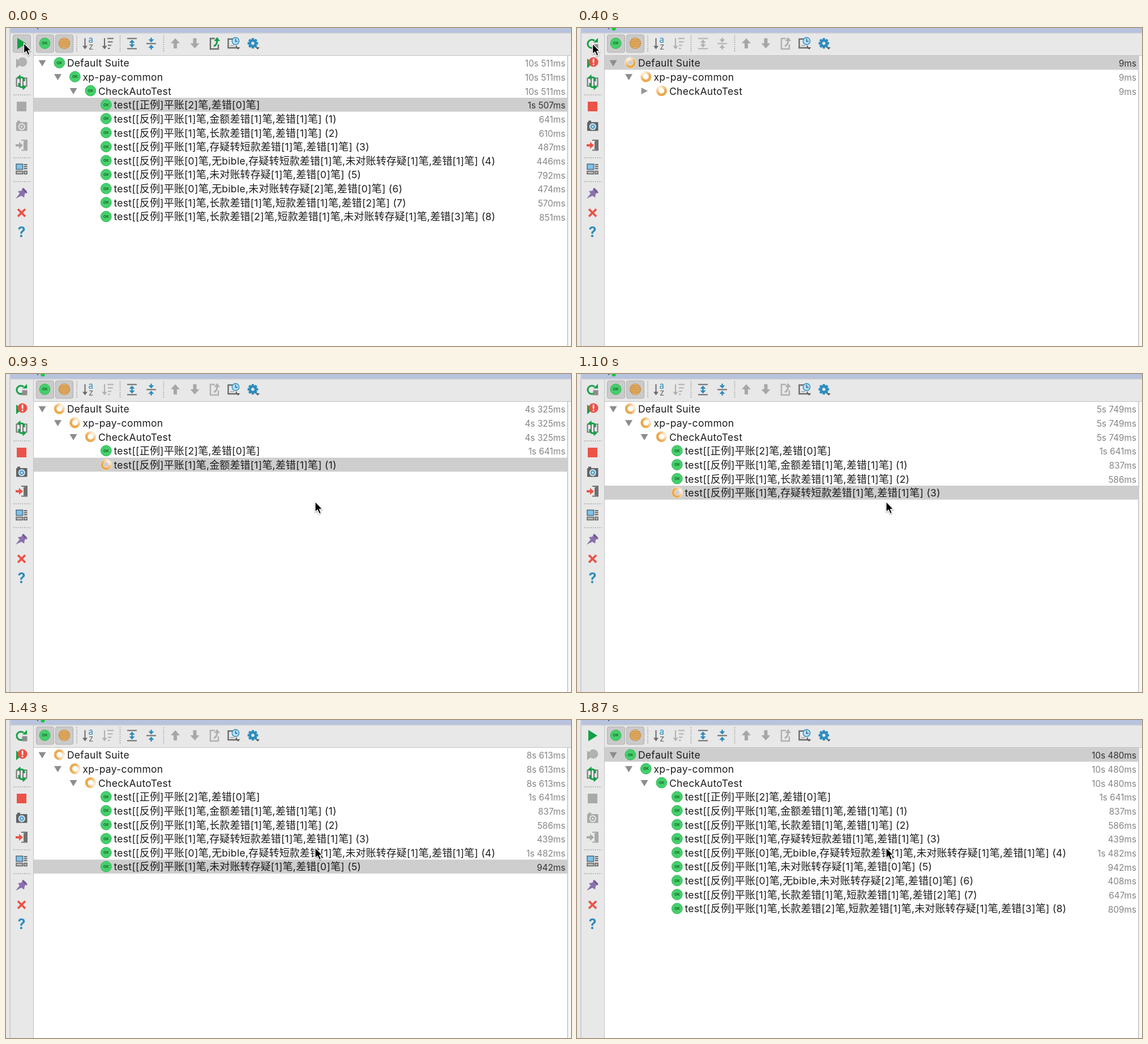
An HTML page for the animation above (1900 ms loop, 998 px wide and 561 px high).

```html
<!DOCTYPE html>
<html lang="zh-CN">
<head>
<meta charset="utf-8">
<title>Test runner</title>
<style>
html, body { margin: 0; width: 100%; height: 100%; overflow: hidden; background: #fff; }
svg { display: block; width: 998px; height: 561px; }
text { font-family: Inter, "Noto Sans CJK SC", "Noto Sans CJK", sans-serif; }
.name { font-size: 17.5px; letter-spacing: .32px; fill: #1c1c1c; }
.name tspan { font-family: "Noto Sans CJK SC", "Noto Sans CJK", sans-serif; font-size: 18.1px; letter-spacing: 0; }
.time { font-size: 15.3px; fill: #858585; text-anchor: end; }
.time.sel { fill: #333; }
.ok { font-size: 6.6px; font-weight: 700; fill: #17662f; text-anchor: middle; }
.dots { stroke: #9b9b9b; stroke-width: 1.6; stroke-dasharray: 1.6 2.2; }
</style>
</head>
<body>
<svg viewBox="0 0 998 561">
  <defs>
    <g id="ok">
      <circle r="9.4" fill="#45cf6b" stroke="#35b65a" stroke-width="1"/>
      <text class="ok" y="2.3">OK</text>
    </g>
    <g id="spinner"></g>
  </defs>
  <g id="chrome"></g>
  <g id="tree"></g>
  <g id="tools"></g>
  <path id="cursor" d="M0 0V18.6L4.3 14.7L7.3 21.6L10.500 20.200L7.600 13.500H13.2Z" fill="#000" stroke="#fff" stroke-width="1.3" stroke-linejoin="round" style="filter:drop-shadow(0 1px 1px #0006)"/>
</svg>
<script>
const LOOP = 1900, RESTART = 270, FIRST_TEST = 640, FINISHED = 1700;
const ROW = 24.66, INDENT = 27.5;
const GREY = '#a9a9a9', DARK = '#6b6b6b', GREEN = '#12a045', RED = '#ec5247', BLUE = '#2b8cbe';

const suites = ['Default Suite', 'xp-pay-common', 'CheckAutoTest'];
const tests = [
  '[正例]平账[2]笔,差错[0]笔]',
  '[反例]平账[1]笔,金额差错[1]笔,差错[1]笔] (1)',
  '[反例]平账[1]笔,长款差错[1]笔,差错[1]笔] (2)',
  '[反例]平账[1]笔,存疑转短款差错[1]笔,差错[1]笔] (3)',
  '[反例]平账[0]笔,无bible,存疑转短款差错[1]笔,未对账转存疑[1]笔,差错[1]笔] (4)',
  '[反例]平账[1]笔,未对账转存疑[1]笔,差错[0]笔] (5)',
  '[反例]平账[0]笔,无bible,未对账转存疑[2]笔,差错[0]笔] (6)',
  '[反例]平账[1]笔,长款差错[1]笔,短款差错[1]笔,差错[2]笔] (7)',
  '[反例]平账[1]笔,长款差错[2]笔,短款差错[1]笔,未对账转存疑[1]笔,差错[3]笔] (8)'
].map(s => 'test[' + s);
const oldTimes = [1507, 641, 610, 487, 446, 792, 474, 570, 851];
const newTimes = [1641, 837, 586, 439, 1482, 942, 408, 647, 809];
const totals = [4325, 5162, 5749, 6189, 7671, 8613, 9022, 9670, 10480];
const doneAt = totals.map(ms => 860 + 0.131 * (ms - totals[0]));

const $ = id => document.getElementById(id);
const path = (d, fill) => `<path d="${d}" fill="${fill}"/>`;
const line = (d, color, width = 2) => `<path d="${d}" fill="none" stroke="${color}" stroke-width="${width}"/>`;
const rect = (x, y, w, h, fill, extra = '') => `<rect x="${x}" y="${y}" width="${w}" height="${h}" fill="${fill}" ${extra}/>`;
const circle = (x, y, r, fill, extra = '') => `<circle cx="${x}" cy="${y}" r="${r}" fill="${fill}" ${extra}/>`;
const button = x => rect(x, 12, 31, 31, '#cacaca', 'rx="3" stroke="#b0b0b0"');
const duration = ms => (ms >= 1000 ? Math.floor(ms / 1000) + 's ' : '') + ms % 1000 + 'ms';
const mixScripts = s => s.replace(/[\u4e00-\u9fff]+/g, '<tspan>$&</tspan>');

function drawSpinner() {
  const count = 16, step = 2 * Math.PI / count, r = 7.2;
  const point = a => `${(r * Math.cos(a)).toFixed(2)} ${(r * Math.sin(a)).toFixed(2)}`;
  let out = circle(0, 0, r, 'none', 'stroke="#fdf3e4" stroke-width="5.6"');
  for (let i = 0; i < count; i++) {
    const a = i * step, light = 60 + 32 * Math.pow((1 + Math.cos(a + step / 2)) / 2, 2.2);
    out += line(`M${point(a)}A${r} ${r} 0 0 1 ${point(a + step + 0.04)}`, `hsl(35 80% ${light}%)`, 4.4);
  }
  $('spinner').innerHTML = out;
}

function drawChrome() {
  const stripes = [-6, -3, 0, 3, 6].map(y => {
    const half = Math.sqrt(90 - y * y);
    return line(`M${103 - half} ${27 + y}h${2 * half}`, '#b98645', 1.2);
  }).join('');
  const teeth = [0, 45, 90, 135].map(a =>
    `<rect x="-2.2" y="-9.3" width="4.4" height="18.6" rx="1" fill="${BLUE}" transform="translate(436 27) rotate(${a})"/>`).join('');
  const drop = x => path(`M${x - 3.5} 34h7l-3.5 4z`, '#555');

  $('chrome').innerHTML =
    rect(0, 0, 998, 561, '#e8e8e8') + rect(8, 0, 990, 8.5, '#b8c3dd') +
    line('M8 9H998', '#c4c4c8', 1) + line('M7 0V561', '#b4b4b4', 1) +
    rect(49, 49, 949, 512, '#fff') + line('M48.5 9V561', '#c3c3c3', 1) + line('M49 48.5H998', '#c3c3c3', 1) +
    rect(993, 49, 5, 512, '#f8f8f8') + line('M992 49V561', '#b0b0b0', 1.2) +
    [118, 229, 271].map(y => `<path class="dots" d="M13 ${y}H44"/>`).join('') +
    [125, 201.5, 278.5].map(x => `<path class="dots" d="M${x} 13V43"/>`).join('') +
    button(53.5) + button(87.5) + '<use href="#ok" x="68.5" y="27"/>' +
    circle(103, 27, 9.6, '#eeb665', 'stroke="#c08a44"') + stripes +
    // alphabetical sort
    line('M139.5 18V35', DARK) + path('M135 31.5h9l-4.5 6z', DARK) +
    `<text x="145.500" y="26" font-size="15" fill="${BLUE}">a</text><text x="146" y="38" font-size="15" fill="${DARK}">z</text>` +
    // previous, next
    path('M299 18l8 9h-5v9h-6v-9h-5z', '#a7a7a7') + path('M333.500 36l8-9h-5v-9h-6v9h-5z', '#a7a7a7') +
    // history, settings
    line('M402 19.5H392.500V35H407V31', DARK, 2.4) + line('M396 31h7', GREY, 1.6) +
    circle(405.5, 23, 6.2, '#b5def4', `stroke="${BLUE}" stroke-width="1.4"`) + line('M405.500 19V23.500H409', '#285f82', 1.4) + drop(410) +
    teeth + circle(436, 27, 7, BLUE) + circle(436, 27, 2.8, '#e8e8e8') + drop(444.5) +
    // toggle auto-test
    line('M25 88.500H18.500V102.500H25ZM30 88.500H36.500V102.500H30Z', '#777', 2) +
    line('M32 94V91Q32 86.500 24 87M23 97V100Q23 105 31 104.500', GREEN, 3) +
    path('M25.500 82v10l-6-5z', GREEN) + path('M29.500 99.500v10l6-5z', GREEN) +
    // layout
    rect(18, 240, 11.5, 9.5, '#7cc3ea', 'stroke="#4f6c80" stroke-width="1.5"') +
    [240, 243.5, 247].map(y => rect(31.5, y, 6, 2.2, '#6d6d6d')).join('') +
    rect(18, 252.5, 11.5, 5, '#b9b9b9', 'stroke="#626262" stroke-width="1.5"') +
    rect(32, 252.5, 5, 5, '#b9b9b9', 'stroke="#626262" stroke-width="1.5"') +
    // pin
    path('M17 301l7-9-3-4 6-1 4-5 6 6-4 5-1 6-5-3z', '#8b70ad') + line('M29 283L37 291', '#6f568f', 2.4) +
    // close, help
    line('M21 319.500L34 332.500M34 319.500L21 332.500', RED, 3.8) +
    `<text x="27.500" y="369" font-size="25" font-weight="700" fill="${BLUE}" text-anchor="middle">?</text>`;
}

function drawTools(s) {
  const faint = '#b0b0b0';
  const on = color => s.running ? color : GREY;
  const sort = s.before ? DARK : faint;
  const edge = s.starting ? faint : DARK, arrow = s.starting ? faint : BLUE;
  let out = rect(55, 0, 2, 2, '#566080');

  if (s.running) {
    out += circle(65, 1, 3.5, '#16c735');
    out += line('M31 33.500A7.300 7.300 0 1 1 31 22.500', GREEN, 3) + path('M29 25.500h8v-8z', GREEN) + rect(28.5, 28.5, 9, 9, '#8d8d8d');
    out += path('M18 54l10 8-10 9z', GREEN) + circle(29, 60, 8.6, RED) + rect(27.8, 54, 2.6, 7.4, '#fff') + rect(27.8, 63, 2.6, 2.6, '#fff');
  } else {
    if (s.before) out += button(12.5);
    out += path('M20 17.500L36 27.500L20 37.500Z', GREEN);
    out += path('M18 54l10 8-10 9z', GREY) + circle(29, 60, 8.3, '#b1b1b1');
  }
  // stop, snapshot, exit
  out += rect(19, 130, 17, 17, on(RED));
  out += rect(18, 166, 19.5, 15.5, on('#5e6468'), 'rx="1"') + rect(20, 163.5, 5, 3, on('#5e6468')) +
    circle(27.8, 174, 6, '#eee') + circle(27.8, 174, 4.3, on('#4aa3d4')) + circle(27.8, 174, 1.8, '#d8e9f2');
  out += line('M27 198H37V215.500H27', on('#707070'), 2) + path('M31 200l6-2v18l-6-2z', on('#707070')) +
    path('M17 205h6v-4l7 6-7 6v-4h-6z', on(RED));
  // sort by duration
  out += line('M174 18V35', sort) + path('M169.500 31.500h9l-4.500 6z', sort) +
    line('M179 18.500h11M180 24.500h8.500M180 30.500h6M180 36h3.500', sort, 2.2);
  // expand and collapse
  out += line('M214 18.500h17M214 36.500h17', edge, 2) + line('M222.500 23V32', arrow, 2.4) +
    path('M217.500 26l5-5.500 5 5.500z', arrow) + path('M217.500 29l5 5.500 5-5.500z', arrow);
  out += line('M248 27.500h17', edge, 2) + line('M256.500 17V22M256.500 33V38', arrow, 2.4) +
    path('M251.500 20l5 5.500 5-5.500z', arrow) + path('M251.500 35l5-5.500 5 5.500z', arrow);
  // export
  out += line('M369 18.500H361V37H375V29', s.before ? DARK : faint, 2.4) +
    line('M367 32Q373 30 373 21', s.before ? GREEN : faint, 3) + path('M367.500 23l5.500-7 5 7z', s.before ? GREEN : faint);
  $('tools').innerHTML = out;
}

function stateAt(t) {
  if (t < RESTART) return { before: true, shown: 9, done: 9, total: 10511, selected: 3, times: oldTimes };
  if (t < FIRST_TEST) return { running: true, starting: true, shown: 0, done: 0, total: 9, selected: 0, times: newTimes };
  if (t >= FINISHED) return { shown: 9, done: 9, total: 10480, selected: 0, times: newTimes };
  const done = doneAt.filter(at => at <= t).length;
  const shown = Math.min(9, 1 + doneAt.filter(at => at + 30 <= t).length);
  return { running: true, shown, done, total: done ? totals[done - 1] : 2683, selected: shown + 2, times: newTimes };
}

function drawRow(s, i, angle) {
  const test = i - 3, isTest = test >= 0, level = Math.min(i, 3);
  const top = 49 + i * ROW, mid = top + 12.7, shift = level * INDENT, selected = s.selected === i;
  const passed = isTest ? test < s.done : !s.running;
  const closed = s.starting && i === 2 || test === 0 && !passed;
  let out = selected ? rect(49, top, 942.5, ROW, '#cecece') : '';
  if (closed) out += path(`M${58.5 + shift} ${mid - 6}l11.5 6-11.5 6z`, '#979797');
  else if (!isTest) out += path(`M${57.5 + shift} ${mid - 5}h13l-6.500 11z`, '#8d8d8d');
  out += passed ? `<use href="#ok" x="${94.3 + shift}" y="${mid - 0.4}"/>`
    : `<use href="#spinner" transform="translate(${94.3 + shift} ${mid - 0.4}) rotate(${angle})"/>`;
  out += `<text class="name" x="${107.9 + shift}" y="${top + 19.2}">${mixScripts(isTest ? tests[test] : suites[i])}</text>`;
  if (passed || !isTest) {
    out += `<text class="time${selected ? ' sel' : ''}" x="988" y="${top + 19.4}">${duration(isTest ? s.times[test] : s.total)}</text>`;
  }
  return out;
}

function cursorAt(t) {
  const ease = (from, to) => {
    const p = Math.max(0, Math.min(1, (t - from) / (to - from)));
    return p * p * (3 - 2 * p);
  };
  const settle = ease(30, 200), leave = ease(470, 630);
  return [31.5 - 4 * settle + 518.5 * leave, 26.5 + settle + 197.5 * leave];
}

function render(t) {
  const s = stateAt(t), angle = -120 + (t - 400) * 0.135;
  let rows = '';
  for (let i = 0; i < s.shown + 3; i++) rows += drawRow(s, i, angle);
  $('tree').innerHTML = rows;
  drawTools(s);
  $('cursor').setAttribute('transform', `translate(${cursorAt(t)})`);
}

drawSpinner();
drawChrome();
const start = performance.now();
function tick() {
  render((performance.now() - start) % LOOP);
  requestAnimationFrame(tick);
}
tick();
</script>
</body>
</html>
```
